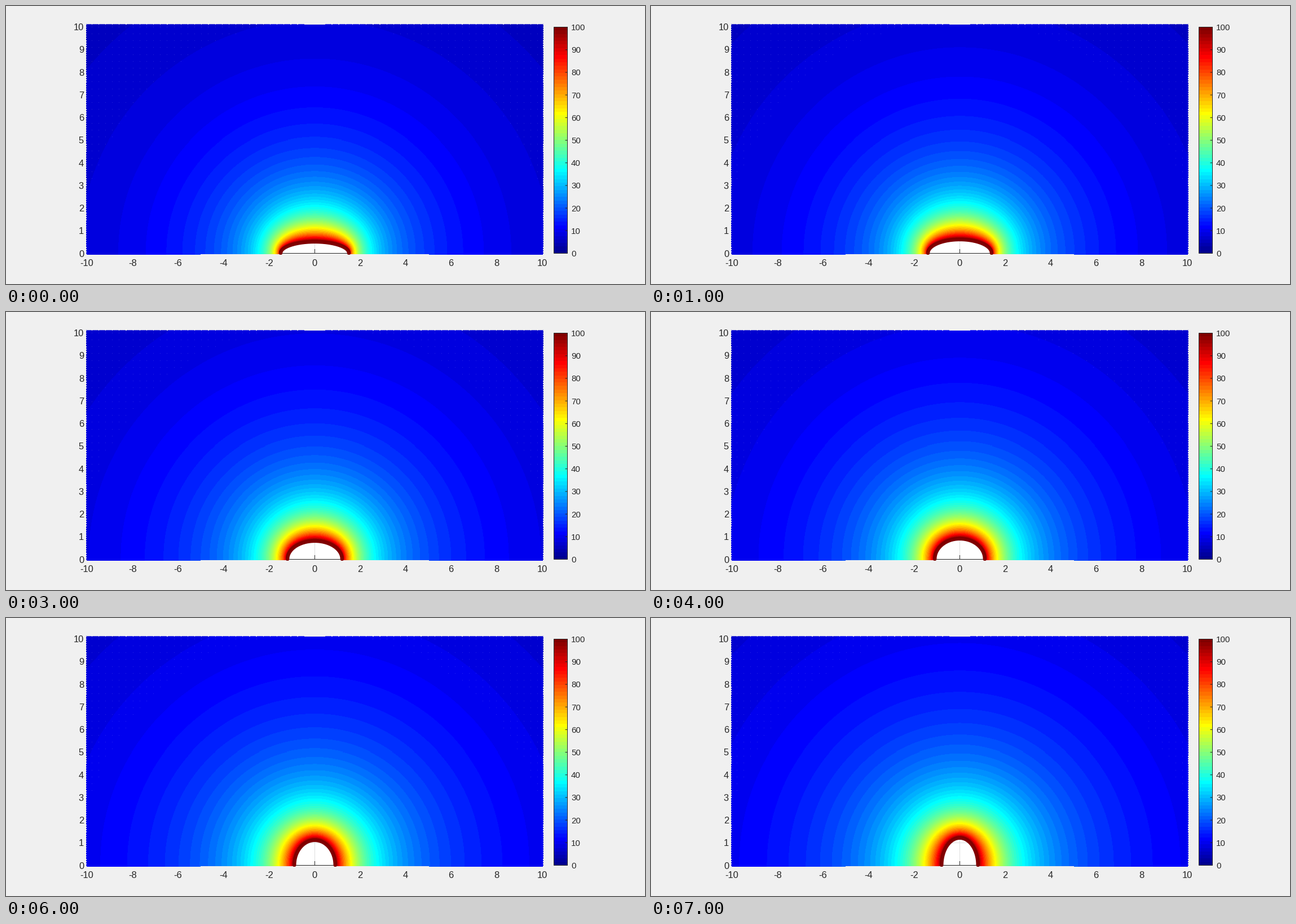
These frames come from a looping animation (1133 by 494 pixels, 8000 ms). A matplotlib script:

```python
import numpy as np
import matplotlib.pyplot as plt
from matplotlib.animation import FuncAnimation
from matplotlib.patches import Rectangle

W, H, DPI = 1133, 494, 100
PX = 72 / DPI                       # one pixel in points
X0, Y0, SX, SY = 547.5, 440, 40.35, 40.25
LEFT, RIGHT, TOP, BOTTOM = 142, 953, 33, 442
DOT_X, DOT_Y = 4.055, 4.066         # spacing of the field's dots
INK = "#262626"
FRAMES, STEP_MS = 8, 1000


def jet64():
    i = np.arange(1, 65)

    def ramp(j):
        return np.clip(np.minimum(j, 48 - j) / 16, 0, 1)

    return np.column_stack([ramp(i - 24), ramp(i - 8), ramp(i + 8)])


def axes_of(step):
    return 1.5 - 0.1 * step, 0.5 + 0.1 * step


def potential(x, y, a, b):
    """Field of a charged spheroid, rotated about the x axis, 100 on its surface."""
    p = x**2 + y**2 - a**2 - b**2
    q = (a * b)**2 - (x * b)**2 - (y * a)**2
    lam = np.maximum((p + np.sqrt(np.maximum(p**2 - 4 * q, 0))) / 2, 0)
    major = np.sqrt(a**2 + lam)
    k = np.sqrt(abs(a**2 - b**2))
    if abs(a - b) < 1e-6:
        return 100 * a / major
    f = np.arctanh if a > b else np.arctan
    return 100 * f(k / major) / f(k / a)


def near(pos, period):
    """Distance to the closest multiple of the period."""
    return abs((pos + period / 2) % period - period / 2)


JET = jet64()
cols, rows = np.meshgrid(np.arange(LEFT, RIGHT), np.arange(TOP, BOTTOM))
dx = cols + 0.5 - X0
gx = dx / SX
gy = (Y0 - 1 - rows - 0.5) / SY

# the rim of the field is slightly scalloped by its round dots
shown = np.ones(cols.shape)
side = (cols == LEFT) | (cols == RIGHT - 1)
shown[side & (near(rows - 36, DOT_Y) > 1.4)] = 0
shown[(rows == TOP) & (abs(dx) < 19)] = 0
shown[(rows == TOP) & (near(dx - 1.5 * DOT_X, 3 * DOT_X) < 0.6)] = 0
shown[(rows >= BOTTOM - 1) & (abs(gx) < 5.02)] = 0
shown[TOP - TOP] *= 0.7

# faint gaps between the dots, far from the centre
gaps = ((near(dx - 1.5 * DOT_X, 3 * DOT_X) < 0.5)
        & (near(rows - 50, 3 * DOT_Y) < 0.5)
        & (np.hypot(gx, gy) > 10.25))


def field_image(step):
    a, b = axes_of(step)
    v = potential(gx, np.maximum(gy - 0.04, 0), a, b)
    img = np.zeros(cols.shape + (4,))
    img[..., :3] = JET[np.clip((v * 0.64).astype(int), 0, 63)]
    img[gaps, :3] += 0.15 * (1 - img[gaps, :3])
    img[..., 3] = shown * ((gx / a)**2 + (gy / b)**2 >= 1)
    return img


def ring_points(step):
    a, b = axes_of(step)
    t = np.linspace(0, np.pi, 181)
    return X0 + SX * a * np.cos(t), Y0 - 1 - SY * b * np.sin(t)


fig = plt.figure(figsize=(W / DPI, H / DPI), dpi=DPI, facecolor="#f0f0f0")
ax = fig.add_axes([0, 0, 1, 1])
ax.axis("off")


def line(xs, ys, color=INK, z=2, width=1):
    ax.plot(xs, ys, color=color, lw=width * PX, zorder=z,
            solid_capstyle="butt", snap=False)


def label(x, y, s, size, ha):
    ax.text(x, y - 0.5, s, fontsize=size * PX, family="Liberation Sans",
            color=INK, ha=ha, va="center_baseline")


# plot box, only seen through the hole
ax.add_patch(Rectangle((144, 38), 807, 402, fc="white", ec="none", zorder=1))
line([X0] * 2, [40, 439], "#dfdfdf", 1.5)
line([145, 950], [399.5, 399.5], "#dfdfdf", 1.5)
line([144, 951], [439.5, 439.5])
line([X0] * 2, [432, 440])

for n in range(-10, 11, 2):
    label(X0 - 0.5 + n * SX, 456.5, str(n), 16.5, "center")
for n in range(11):
    label(138, Y0 - n * SY, str(n), 16.5, "right")

# colour bar
ax.imshow(JET[::-1, None, :], extent=(972, 996, 440, 37.5), aspect="auto",
          interpolation="nearest", zorder=2)
ax.add_patch(Rectangle((971.5, 37.5), 24, 402, fill=False, ec=INK,
                       lw=PX, zorder=3, snap=False))
for n in range(0, 101, 10):
    y = Y0 - 0.5 - n * 4.02
    line([991.5, 995.5], [y, y], z=3)
    label(1002, y + 0.5, str(n), 15, "left")

field = ax.imshow(field_image(0), extent=(LEFT, RIGHT, BOTTOM, TOP),
                  aspect="auto", interpolation="nearest", zorder=4)

ring, = ax.plot([], [], color=JET[-1], lw=6.6 * PX, zorder=6,
                solid_capstyle="round")
ring.set_clip_path(Rectangle((0, 0), W, 441.5, transform=ax.transData))

ax.set_xlim(0, W)
ax.set_ylim(H, 0)


def draw(step):
    field.set_data(field_image(step))
    ring.set_data(*ring_points(step))
    return field, ring


anim = FuncAnimation(fig, draw, frames=FRAMES, interval=STEP_MS, repeat=True,
                     repeat_delay=0, blit=False)
plt.show()
```
